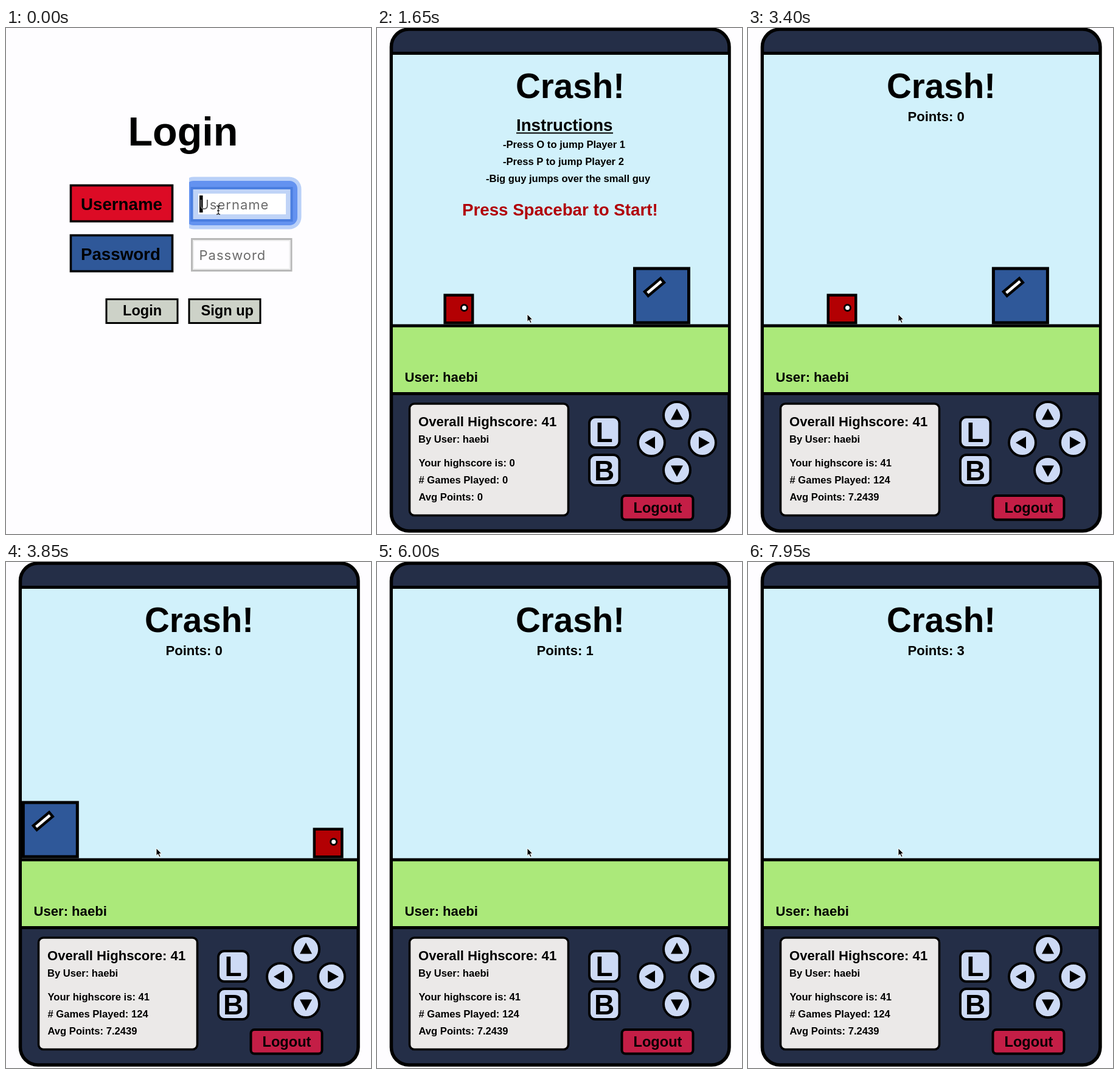
Recreate the animation shown at these times as an HTML page. Size 600 by 831 pixels, loop 8000 ms.

```html
<!DOCTYPE html>
<html lang="en">
<head>
<meta charset="utf-8">
<title>Crash!</title>
<style>
  html, body { margin: 0; width: 100%; height: 100%; overflow: hidden; background: #fefdff; }
  svg { display: block; width: 100vw; height: 100vh; }
  text { font: bold 16.6px "Liberation Sans", Arial, sans-serif; white-space: pre; }
  .s22 { font-size: 22.1px; }
  .s24 { font-size: 23.6px; }
  .s28 { font-size: 27.7px; }
  .field { font: 22px Inter, sans-serif; letter-spacing: 1px; }
  .line { stroke: #000; }
</style>
</head>
<body>
<svg viewBox="0 0 600 831">
  <defs>
    <clipPath id="sky"><rect x="25" y="42" width="553" height="447"/></clipPath>
    <clipPath id="form"><rect x="301" y="230" width="200" height="200"/></clipPath>
    <path id="arrow" d="M0 0V12.5L2.8 9.8L5 14.6L7.2 13.6L5 9H8.8Z" stroke="#fff"/>
    <path id="beam" d="M-3-6Q0-6 0-4Q0-6 3-6M0-4V6M-2 2H2M-3 8Q0 8 0 6Q0 8 3 8" fill="none" stroke="#222" stroke-width="1.3"/>
  </defs>

  <g id="login">
    <text x="200.5" y="193" style="font-size:66.5px">Login</text>
    <g class="line" stroke-width="3.6">
      <rect x="106.5" y="258.5" width="167" height="59" fill="#dc0b25"/>
      <rect x="106.5" y="340.5" width="167" height="59" fill="#2f5899"/>
      <g fill="#cdd2c8" stroke-width="3">
        <rect x="165" y="445.5" width="117" height="39"/>
        <rect x="301" y="445.5" width="117" height="39"/>
      </g>
    </g>
    <text class="s28" x="123" y="299">Username</text>
    <text class="s28" x="123" y="381">Password</text>
    <text class="s24" x="192" y="472">Login</text>
    <text class="s24" x="320.5" y="472">Sign up</text>
    <g id="fields" clip-path="url(#form)"></g>
  </g>

  <g id="game">
    <rect class="line" x="23.5" y="2" width="555.5" height="824" rx="29" fill="#242e47" stroke-width="5.5"/>
    <path fill="#d1f1fb" d="M26 44H577V487H26Z"/>
    <path fill="#abe97a" d="M26 491H577V599H26Z"/>
    <path class="line" stroke-width="5" d="M24 41.5H579M24 489H579M24 600.5H579"/>
    <text x="228" y="115" style="font-size:56.5px">Crash!</text>
    <g id="intro">
      <text class="s28" x="229" y="169">Instructions</text>
      <path class="line" stroke-width="2" d="M229 172.5H388"/>
      <text x="207" y="197">-Press O to jump Player 1</text>
      <text x="207" y="225">-Press P to jump Player 2</text>
      <text x="179" y="253">-Big guy jumps over the small guy</text>
      <text class="s28" x="140" y="308" fill="#b10008">Press Spacebar to Start!</text>
    </g>
    <text class="s22" id="points" x="262.5" y="153"></text>
    <g id="players" clip-path="url(#sky)"></g>
    <text class="s22" x="45.5" y="581">User: haebi</text>

    <rect class="line" x="53.5" y="617" width="261" height="183.5" rx="8" fill="#ebe9e8" stroke-width="3.6"/>
    <text class="s22" x="68" y="654">Overall Highscore: 41</text>
    <text x="68" y="681">By User: haebi</text>
    <text id="best" x="68.5" y="720"></text>
    <text id="played" x="68.5" y="748"></text>
    <text id="average" x="68.5" y="776"></text>

    <g class="line" fill="#cddaf5" stroke-width="4">
      <rect x="349" y="639" width="49.5" height="50" rx="10"/>
      <rect x="349" y="701" width="49.5" height="50" rx="10"/>
      <circle cx="493" cy="636" r="22"/>
      <circle cx="451" cy="681" r="22"/>
      <circle cx="535" cy="681" r="22"/>
      <circle cx="493" cy="726" r="22"/>
      <rect x="402.5" y="768" width="117" height="39.5" rx="6" fill="#c41e46"/>
    </g>
    <path d="M493 625L503 643.5H483ZM440 681L457 671V691ZM547 681L529 671V691ZM493 737L503 718.5H483Z"/>
    <text x="373.5" y="680" text-anchor="middle" style="font-size:46px">L</text>
    <text x="373.5" y="743" text-anchor="middle" style="font-size:46px">B</text>
    <text class="s24" x="421.5" y="796">Logout</text>
  </g>

  <use id="pointer"/>
</svg>

<script>
const LOOP = 8000, STEP = 50, GAME_AT = 1650, STATS_AT = 1800, START_AT = 2850, ROUND = 1700;
const FIRST_CROSSING = 3576, SPEED = 0.8335, MIDDLE = 301.2, FLOOR = 486.5;
const JUMP_TIME = 400, JUMP_HEIGHT = 127;
const PASSWORD_FOCUS = 800, BLUR_AT = 1400;

const rounds = [
  { big: "blue", jump: 3420 },
  { big: "red", jump: 5150 },
  { big: "red", jump: 6810 }
];
// time, x, y
const pointerPath = [[0, 349, 298], [300, 310, 299], [800, 197, 300], [950, 197, 300], [1350, 247, 470]];

const el = id => document.getElementById(id);
const show = (id, on) => el(id).style.display = on ? "" : "none";
const clamp = v => Math.min(1, Math.max(0, v));
const typed = (word, t, start, step) => word.slice(0, Math.max(0, Math.floor((t - start) / step) + 1));
const box = (x, y, w, h, fill, more = "") =>
  `<rect x="${x}" y="${y}" width="${w}" height="${h}" fill="${fill}" ${more}/>`;

const ruler = document.createElement("canvas").getContext("2d");
function textWidth(text) {
  ruler.font = "22px Inter, sans-serif";
  return ruler.measureText(text).width + text.length;
}

function field(y, hint, value, focusAge) {
  const focused = focusAge >= 0;
  let out = "";
  if (focused) {
    const grow = 1 - clamp((focusAge - 30) / 170);
    const ring = (pad, color, rx) =>
      box(304 - pad, y - 2 - pad, 166 + 2 * pad, 55 + 2 * pad, color, `rx="${rx}"`);
    out += ring(5 + 10.5 * grow, "#b9d0f8", 4 + 16 * grow) + ring(3 + 6 * grow, "#6392f0", 3 + 10 * grow);
    out += box(305.5, y + 1, 164, 53, "#c0d4f7", 'stroke="#4a7ee0" stroke-width="4"');
    out += box(316, y + 10, 144, 34, "#fff");
  } else {
    out += box(305.5, y + 1.5, 163.5, 52, "#fefdff", 'stroke="#b8b8b8" stroke-width="3"');
    out += box(308, y + 4, 158.5, 47, "none", 'stroke="#ececec" stroke-width="2"');
  }
  if (focused) out += box(318 + textWidth(value), y + 13, 5.5, 28, "#000");
  return out + `<text class="field" x="317.5" y="${y + 36}" fill="${value ? "#111" : "#6b6b6b"}">${value || hint}</text>`;
}

function drawLogin(t) {
  const name = typed("haebi", t, 150, 110);
  const secret = typed("•••••", t, 950, 70);
  const userAge = t < PASSWORD_FOCUS ? t : -1;
  const passAge = t < BLUR_AT ? t - PASSWORD_FOCUS : -1;
  el("fields").innerHTML = field(345, "Password", secret, passAge) + field(262, "Username", name, userAge);
}

function player(color, center, big, lift) {
  const size = big ? 94 : 50, edge = big ? 5 : 4.5;
  const red = color === "red";
  const body = box(edge / 2, edge / 2, size - edge, size - edge, red ? "#b30003" : "#2f5899", `stroke-width="${edge}"`);
  let eye;
  if (red) {
    eye = big ? '<circle cx="64" cy="38.5" r="8.3" stroke-width="5"/>'
              : '<circle cx="34" cy="23" r="5" stroke-width="3"/>';
  } else {
    eye = big ? '<rect x="-17" y="-4.5" width="34" height="9" stroke-width="4.5" transform="translate(35 33) rotate(-40)"/>'
              : '<rect x="-7.5" y="-2.7" width="15" height="5.4" stroke-width="2.6" transform="translate(19.3 19.3) rotate(-40)"/>';
  }
  return `<g class="line" fill="#fff" transform="translate(${center - size / 2} ${FLOOR - size - lift})">${body}${eye}</g>`;
}

function drawGame(t) {
  const started = t >= START_AT, loaded = t >= STATS_AT;
  const points = Math.floor((t - START_AT) / ROUND);
  show("intro", !started);
  el("points").textContent = started ? `Points: ${points}` : "";
  el("best").textContent = `Your highscore is: ${loaded ? 41 : 0}`;
  el("played").textContent = `# Games Played: ${loaded ? 124 : 0}`;
  el("average").textContent = `Avg Points: ${loaded ? 7.2439 : 0}`;

  const round = rounds[Math.max(0, points)];
  let out = "";
  if (round) {
    const offset = started ? (t - FIRST_CROSSING - points * ROUND) * SPEED : -166.8;
    const u = clamp((t - round.jump) / JUMP_TIME);
    const lift = JUMP_HEIGHT * 4 * u * (1 - u);
    for (const [color, side] of [["red", 1], ["blue", -1]]) {
      const big = round.big === color;
      out += player(color, MIDDLE + side * offset, big, big ? lift : 0);
    }
  }
  el("players").innerHTML = out;
}

function drawPointer(t) {
  const next = pointerPath.findIndex(p => p[0] > t);
  let [, x, y] = pointerPath.at(-1);
  if (next > 0) {
    const [t0, x0, y0] = pointerPath[next - 1], [t1, x1, y1] = pointerPath[next];
    const u = (t - t0) / (t1 - t0), ease = u * u * (3 - 2 * u);
    x = x0 + (x1 - x0) * ease;
    y = y0 + (y1 - y0) * ease;
  }
  el("pointer").setAttribute("href", x > 304 ? "#beam" : "#arrow");
  el("pointer").setAttribute("transform", `translate(${x} ${y})`);
}

const begin = performance.now();
function frame() {
  // The picture advances in 50 ms steps; the small lead absorbs timer jitter.
  const elapsed = (performance.now() - begin + 8) % LOOP;
  const t = Math.floor(elapsed / STEP) * STEP;
  const playing = t >= GAME_AT;
  show("login", !playing);
  show("game", playing);
  if (playing) drawGame(t);
  else drawLogin(t);
  drawPointer(t);
  requestAnimationFrame(frame);
}
frame();
</script>
</body>
</html>
```
